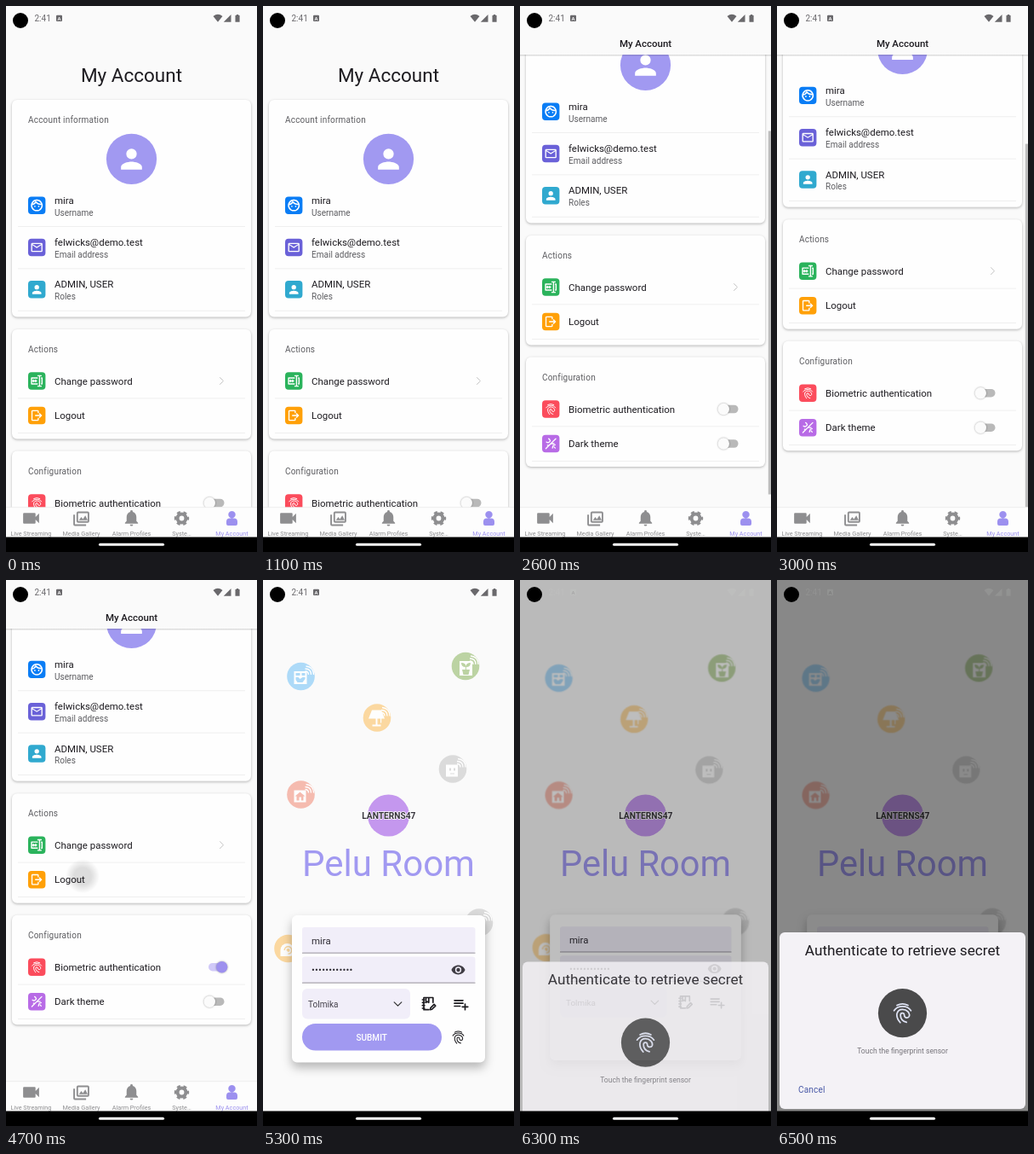
Recreate the animation shown at these times as an HTML page. Size 295 by 640 pixels, loop 8000 ms.

```html
<!DOCTYPE html>
<html lang="en">
<head>
<meta charset="utf-8">
<title>Account screen</title>
<style>
html, body { margin: 0; width: 100%; height: 100%; overflow: hidden; background: #fafafa }
svg { display: block; width: 100vw; height: 100vh; font-family: Roboto, Arial, sans-serif }
.card { fill: #fefefe; filter: drop-shadow(0 1px 1.5px rgba(0,0,0,.28)) }
.form { fill: #fefefe; filter: drop-shadow(0 6px 6px rgba(0,0,0,.28)) }
.knob { filter: drop-shadow(0 .5px 1px rgba(0,0,0,.35)) }
</style>
</head>
<body>
<svg id="stage" viewBox="0 0 295 640"></svg>
<script>
const LOOP = 8000, STEP = 100;
const INK = '#1d1b20', SOFT = '#5c5c60', GREY = '#8e8e90', VIOLET = '#a199f1';

// Drawing helpers; text and icons are placed by their vertical centre.
const text = (x, y, size, str, fill = INK, attrs = '') =>
  `<text x="${x}" y="${y + size * .355}" font-size="${size}" fill="${fill}" ${attrs}>${str}</text>`;
const mid = 'text-anchor="middle"', medium = 'font-weight="500"', spaced = 'letter-spacing=".18"';
const rect = (x, y, w, h, r, fill, attrs = '') =>
  `<rect x="${x}" y="${y}" width="${w}" height="${h}" rx="${r}" fill="${fill}" ${attrs}/>`;
const disc = (x, y, r, fill, attrs = '') => `<circle cx="${x}" cy="${y}" r="${r}" fill="${fill}" ${attrs}/>`;
const place = (x, y, size) => `transform="translate(${x - size / 2} ${y - size / 2}) scale(${size / 24})"`;
const icon = (x, y, size, d, fill) => `<path ${place(x, y, size)} d="${d}" fill="${fill}" fill-rule="evenodd"/>`;
const lines = (x, y, size, d, color, w = 2) =>
  `<path ${place(x, y, size)} d="${d}" fill="none" stroke="${color}" stroke-width="${w}" stroke-linecap="round" stroke-linejoin="round"/>`;
const group = (id, body, attrs = '') => `<g id="${id}" ${attrs}>${body}</g>`;

const PERSON = 'M12 12a4 4 0 1 0 0-8 4 4 0 0 0 0 8zm0 2c-2.7 0-8 1.3-8 4v2h16v-2c0-2.7-5.3-4-8-4z';
const MAIL = 'M4 4h16a2 2 0 0 1 2 2v12a2 2 0 0 1-2 2H4a2 2 0 0 1-2-2V6a2 2 0 0 1 2-2zM4 8v10h16V8l-8 5zM4 6l8 5 8-5z';
const LOGOUT = 'M17 7.5l-1.5 1.5 2 2H9v2.2h8.5l-2 2L17 16.6l4.5-4.5zM4.5 4.5h9V8h2V4.5a2 2 0 0 0-2-2h-9a2 2 0 0 0-2 2v15a2 2 0 0 0 2 2h9a2 2 0 0 0 2-2V16h-2v3.5h-9z';
const FACE = 'M12 2.5a9.5 9.5 0 1 0 .01 0M3 10.5q5 0 7-5 4 5 10.5 4.5M8.5 13.5v.6M15.5 13.5v.6';
const FIELD = 'M13 6.5H2.5v11H13M17 2.5v19M14 2.5h6M14 21.5h6M20.5 6.5h1v11h-1M6 10.5v3M10 10.5v3M4.5 12h7';
const MOON = 'M3 21L21 3M4 9q4 3 7-2-1-3-3-4M15 20l1-4M20 14l-3 1M20 20l-2-2M6 15l1 0M13 12l5 0';
const PRINT = 'M6.5 4.2q5.5-3 11 0M3.5 9.5c3.8-5.5 13.2-5.5 17 0M9.7 21.5C4 15 6 8.2 12 8.2c4.5 0 7.7 3.8 6.8 6.8-1 2.5-5 2-5-1-.2-2.7-3.8-2.6-3.8.2 0 3.5 2.2 6 6 7';
const VIDEO = 'M17 10.5V7a1 1 0 0 0-1-1H4a1 1 0 0 0-1 1v10a1 1 0 0 0 1 1h12a1 1 0 0 0 1-1v-3.5l4 4v-11z';
const GALLERY = 'M8 4h12a2 2 0 0 1 2 2v10a2 2 0 0 1-2 2H8a2 2 0 0 1-2-2V6a2 2 0 0 1 2-2zm0 2v10h12V6zm1 9l3-4 2 2.5 3-4.5 3 6zM2 8h2v12h14v2H4a2 2 0 0 1-2-2z';
const BELL = 'M12 22a2 2 0 0 0 2-2h-4a2 2 0 0 0 2 2zm6-6v-5c0-3-1.6-5.6-4.5-6.3V4a1.5 1.5 0 0 0-3 0v.7C7.6 5.4 6 8 6 11v5l-2 2v1h16v-1z';
const USER = 'M12 3.5a4.2 4.2 0 1 0 .01 0zM9.5 12h5a4 4 0 0 1 4 4v2.5a2 2 0 0 1-2 2h-9a2 2 0 0 1-2-2V16a4 4 0 0 1 4-4z';
const EYE = 'M12 4.5C7 4.5 2.7 7.6 1 12c1.7 4.4 6 7.5 11 7.5s9.3-3.1 11-7.5c-1.7-4.4-6-7.5-11-7.5zM12 17a5 5 0 1 1 0-10 5 5 0 0 1 0 10zm0-8a3 3 0 1 0 0 6 3 3 0 0 0 0-6z';
const BOOK = 'M13 20H6V3h13v7M13 3v7l-2-1.5L9 10V3M4 6h3M4 10h3M4 14h3M4 18h3M15 20l.5-2.5 5-5 2 2-5 5z';
const ADD = 'M3 7h12M3 11h12M3 15h8M18 12v8M14 16h8';

const tile = (y, color, d, stroked) => rect(26, y - 10.2, 20.4, 20.4, 4, color) +
  (stroked ? lines(36.2, y, 15.5, d, '#fff', stroked) : icon(36.2, y, 16, d, '#fff'));
const rule = y => rect(14, y, 267, .8, 0, '#ebebeb');
const card = (y, h, title) => rect(7, y, 281, h, 6, '#fefefe', 'class="card"') +
  text(26, y + 23.7, 10.04, title, SOFT, spaced);
const info = (y, color, d, stroked, main, sub) => tile(y, color, d, stroked) +
  text(57, y - 6, 11.48, main) + text(57, y + 8.3, 10.04, sub, SOFT) + rule(y + 24.5);
const action = (y, color, d, stroked, label) => tile(y, color, d, stroked) +
  text(57, y, 11.48, label) + rule(y + 20);
const toggle = (y, id) => rect(238, y - 4.8, 18.5, 9.6, 4.8, '#b9b9b9', `id="${id}Track"`) +
  disc(239.3, y, 6.7, '#fbfbfb', `id="${id}Knob" class="knob"`);

const page = text(147.5, 81, 22.5, 'My Account', INK, mid) +
  card(110, 254.5, 'Account information') +
  disc(147.5, 179.3, 29.6, VIOLET) + icon(147.5, 179.5, 37, PERSON, '#fff') +
  info(233.7, '#0a7df5', FACE, 2.4, 'mira', 'Username') +
  info(283, '#6a61d8', MAIL, 0, 'felwicks@demo.test', 'Email address') +
  info(332.3, '#30a9cf', PERSON, 0, 'ADMIN, USER', 'Roles') +
  card(379, 128.5, 'Actions') +
  action(439.5, '#2bb35c', FIELD, 2.2, 'Change password') +
  lines(253.5, 439.5, 12, 'M8 4l8 8-8 8', '#c4c4c4', 2) +
  action(480, '#ffa008', LOGOUT, 0, 'Logout') +
  disc(90, 476, 20, 'url(#ripple)', 'id="tap"') +
  card(521.5, 128.5, 'Configuration') +
  action(582.5, '#fb4c5c', PRINT, 1.5, 'Biometric authentication') + toggle(582.5, 'bio') +
  action(623, '#b86be6', MOON, 2, 'Dark theme') + toggle(623, 'dark');

const gear = '<g stroke="#8e8e90" fill="none"><circle cx="206.5" cy="600.5" r="4.9" stroke-width="4"/>' +
  '<circle cx="206.5" cy="600.5" r="7.3" stroke-width="2.8" stroke-dasharray="4 3.645" stroke-dashoffset="2"/></g>';
const tabs = rect(0, 587.5, 295, 36, 0, '#fdfdfd') + rect(0, 587.5, 295, .6, 0, '#e4e4e4') +
  icon(29.5, 600.5, 25, VIDEO, GREY) + icon(88.5, 600, 22.5, GALLERY, GREY) +
  icon(147.5, 600, 23, BELL, GREY) + gear + icon(265.5, 600.5, 24, USER, '#9c90ef') +
  ['Live Streaming', 'Media Gallery', 'Alarm Profiles', 'Syste…', 'My Account'].map((s, i) =>
    text(29.5 + 59 * i, 618.3, 7.25, s, i < 4 ? GREY : '#9c90ef', mid)).join('');

const home = group('page', page) +
  rect(0, 0, 295, 57, 0, '#fafafa') + rect(0, 57, 295, 2.5, 0, 'url(#edge)', 'id="edgeLine"') +
  text(147.5, 43.5, 11.48, 'My Account', INK, `${mid} ${medium} id="heading"`) +
  rect(291.8, 58, 3.2, 426, 0, '#a9a9a9', 'id="bar"') + tabs;

// A round badge with a white glyph, details in the badge colour and signal arcs.
const device = (x, y, color, glyph, detail = '') => `<g transform="translate(${x} ${y})">` +
  disc(0, 0, 16.3, color) + `<path d="${glyph}" fill="#fff"/>` +
  `<path d="${detail}" fill="${color}" fill-rule="evenodd"/>` +
  '<path d="M6-7q4 0 4 4M6-10q7 0 7 7M7-13q9 1 9 10" transform="translate(-1 1)" fill="none" stroke="#fff" stroke-width="1.3"/></g>';
const BOX = 'M-8-5h14v14h-14z';
const devices = device(44.5, 113, '#8fcdf7', 'M-8-6h15v15h-15z', 'M-6-4h5v3h-5zM1-4h4v3h-4zM-6 1h3l2 2 3-2h3v2l-3 4h-6l-2-3z') +
  device(238, 101, '#a3c380', 'M-7-6h15v17h-15z', 'M-4 4h9l-1.5 6h-6zM0 4v-3q-5 0-5-5 5 0 5.5 4 .5-4 5.5-4 0 5-5 5v3z') +
  device(134, 161.5, '#fbcb7c', 'M-6-9h11l4 10h-19zM-1.5 1h2v7h4v2h-10v-2h4zM4 1h1.2v5h-1.2z') +
  device(223, 221.5, '#cfcfcf', BOX, 'M-4-1h2v3h-2zM1-1h2v3h-2zM-3 5h5v1h-5z') +
  device(44.5, 251.5, '#f3a292', BOX, 'M-1-3l6 5h-2v5h-8v-5h-2zM-2 3v4h2.5v-4z') +
  device(29.5, 432, '#fbcb7c', 'M-9 2a8 8 0 0 1 16 0q0 6-4 7h-12z', 'M-5 2a5 5 0 1 1 5 5v-1.5a3.5 3.5 0 1 0-3.5-3.5zM-2 2a2 2 0 1 1 2 2z') +
  device(254, 401.5, '#cfcfcf', BOX);

const form = rect(34, 393, 227, 172.5, 6, '#fefefe', 'class="form"') +
  [[407, 437], [441.5, 472]].map(([a, b]) => rect(46, a, 203.5, b - a, 3, '#f1eef9') +
    rect(46, b - .3, 203.5, .9, 0, '#8b8792')).join('') +
  text(57, 423, 11.48, 'mira', '#302d35') + text(57, 457, 11.48, '•'.repeat(12), '#302d35', spaced) +
  icon(229.5, 457, 17.5, EYE, '#403d45') +
  rect(46, 479, 127, 35.5, 6, '#f1eef9') + text(53, 497, 10.04, 'Tolmika', '#45424a') +
  lines(158.5, 497, 13, 'M4 8l8 8 8-8', '#333', 2.2) +
  lines(194, 497, 20, BOOK, '#1c1b1f') + lines(232.5, 497, 20, ADD, '#1c1b1f') +
  group('submit', rect(46, 520, 164, 31.5, 15.7, VIOLET) +
    text(127.7, 536, 10.04, 'SUBMIT', '#fff', `${mid} ${medium}`) +
    lines(229.5, 536, 18, PRINT, '#1c1b1f', 1.4));

const login = rect(0, 39, 295, 584, 0, '#fafafa') + group('zoom', group('devices', devices, 'opacity=".72"') +
  text(147.5, 332, 42, 'Pelu Room', VIOLET, mid) + form) +
  disc(147.5, 276, 24.5, '#c497ee') +
  text(147.8, 276.5, 10.2, 'LANTERNS47', '#37343c',
    `${mid} font-weight="700" stroke="#fff" stroke-width="1.6" paint-order="stroke"`);

const status = text(33.5, 14.5, 10, '2:41') + rect(59, 10.7, 7, 7.3, 1, INK) +
  text(62.5, 14.5, 6, 'A', '#fafafa', `${mid} font-weight="700"`) +
  '<path d="M243.5 12q5.5-4.5 11 0l-5.5 6.7zM264.5 10v8.7h-8.7zM269.5 11h1.3v-1h2.5v1h1.3v7.7h-5.1z" fill="#1d1b20"/>';

const sheet = rect(3, 413, 289, 207, 6, '#f4f2f6') +
  text(147.5, 434, 17.2, 'Authenticate to retrieve secret', INK, mid) +
  disc(147.5, 507.7, 28.6, '#4a4a4b') + lines(147.5, 507.7, 28, PRINT, '#dfe3f4', 1.5) +
  text(147.5, 551.5, 8.55, 'Touch the fingerprint sensor', '#77757b', mid) +
  text(25, 597.3, 10.04, 'Cancel', '#4858a6', spaced);

const stage = document.getElementById('stage');
stage.innerHTML = `<defs>
  <radialGradient id="ripple"><stop offset=".5" stop-opacity=".13"/><stop offset="1" stop-opacity="0"/></radialGradient>
  <linearGradient id="edge" x2="0" y2="1"><stop stop-opacity=".16"/><stop offset="1" stop-opacity="0"/></linearGradient>
  </defs>` + rect(0, 0, 295, 640, 0, '#fafafa') + group('home', home) + group('login', login) +
  group('status', status) + rect(0, 0, 295, 640, 0, '#000', 'id="scrim"') +
  group('ghost', status, 'style="filter:invert(1)"') + group('sheet', sheet) +
  disc(17, 17, 9, '#000') + rect(0, 622.5, 295, 17.5, 0, '#000') + rect(109, 629.8, 77, 3, 1.5, '#fff');

const set = (id, attrs) => {
  const el = document.getElementById(id);
  for (const k in attrs) el.setAttribute(k, attrs[k]);
};
const clamp = v => Math.min(1, Math.max(0, v));
const mix = (a, b, p) => a + (b - a) * p;

// Linear interpolation through [time, value] pairs.
const track = (t, keys) => keys.reduce((v, [time, value], i) => {
  if (!i || t < keys[i - 1][0]) return v;
  const [t0, v0] = keys[i - 1];
  return mix(v0, value, clamp((t - t0) / (time - t0)));
}, keys[0][1]);

function draw(t) {
  const scroll = track(t, [[2300, 0], [2400, 44], [2500, 88], [2600, 110], [2700, 121], [2800, 126], [3000, 128.8]]);
  const head = clamp((scroll - 26) / 52);
  set('page', { transform: `translate(0 ${-scroll})` });
  set('edgeLine', { opacity: clamp(scroll / 30) });
  set('heading', { opacity: head, transform: `translate(0 ${mix(18, 0, head)})` });
  set('bar', { y: 58 + scroll * 530 / 659, opacity: track(t, [[2300, 0], [2400, .75], [3000, .75], [3400, 0]]) });

  const on = track(t, [[3200, 0], [3300, .15], [3400, .6], [3500, .9], [3600, 1]]);
  set('bioKnob', { cx: mix(239.3, 253.7, on), fill: on > .5 ? '#9d90ee' : '#fbfbfb' });
  set('bioTrack', { fill: on > .5 ? '#d0c9f8' : '#b9b9b9' });
  set('tap', { r: track(t, [[4700, 20], [5000, 70]]), opacity: t < 4700 ? 0 : track(t, [[4700, 1], [5100, 0]]) });

  set('login', { opacity: track(t, [[4800, 0], [5000, .4], [5300, 1]]) });
  const back = track(t, [[5900, 0], [6200, 1]]);
  set('zoom', { transform: `translate(147.5 320) scale(${mix(1, .99, back)}) translate(-147.5 -320)` });
  set('submit', { opacity: track(t, [[6000, 1], [6300, 0]]) });

  set('scrim', { opacity: track(t, [[6100, 0], [6200, .11], [6300, .255], [6400, .37], [6500, .455]]) });
  set('status', { opacity: t < 6300 ? .65 : 0 });
  set('ghost', { opacity: t < 6300 ? 0 : .1 });
  set('sheet', {
    transform: `translate(0 ${track(t, [[6200, 90], [6300, 34.4], [6400, 9], [6500, 0]])})`,
    opacity: track(t, [[6100, 0], [6200, .3], [6300, .82], [6400, 1]])
  });
}

function frame() {
  const t = performance.now() % LOOP;
  draw(Math.floor(t / STEP) * STEP);
  requestAnimationFrame(frame);
}
frame();
</script>
</body>
</html>
```
